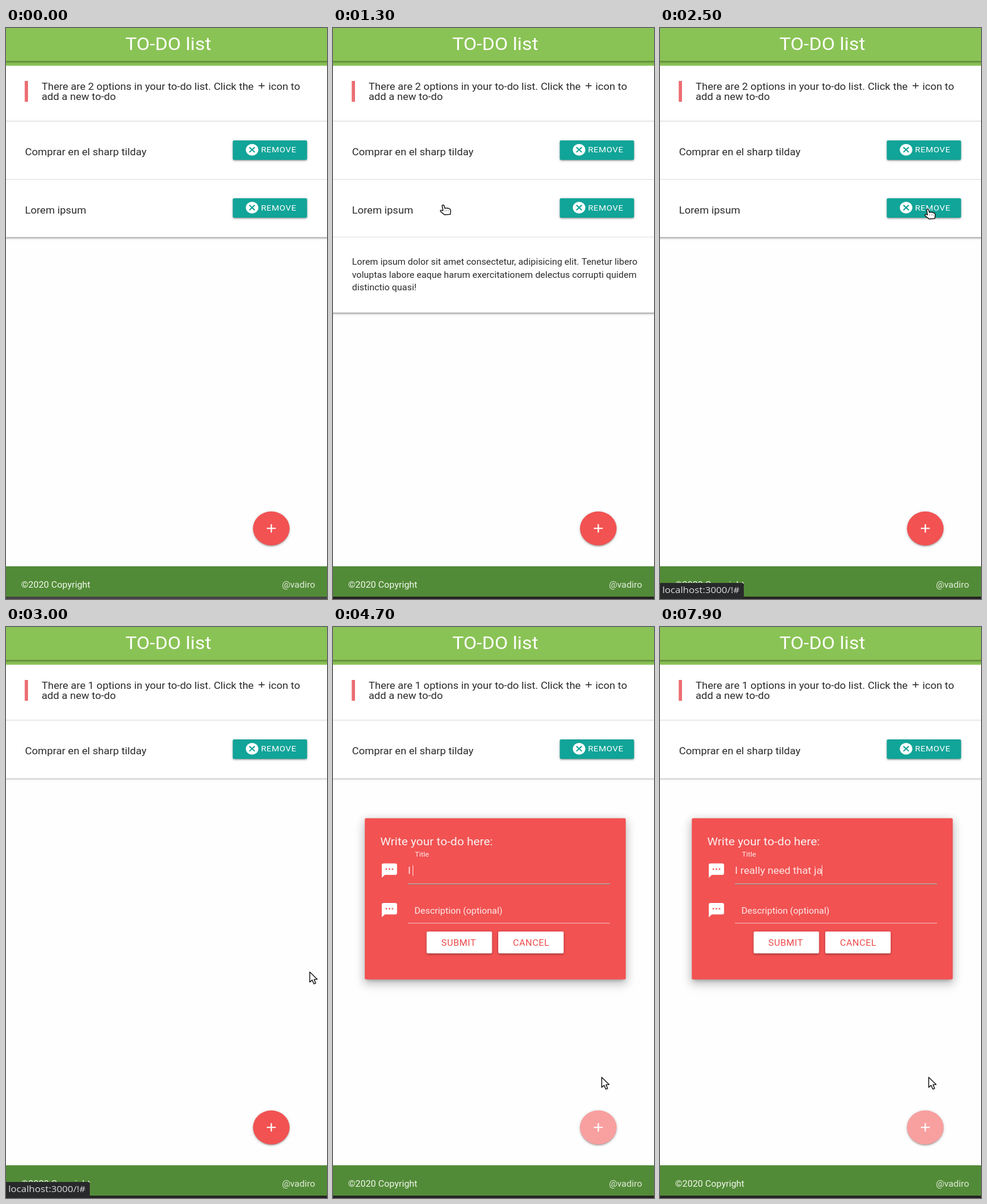
Write an HTML page with a canvas that moves like this. It is 540 px wide and 960 px high and loops after 8000 ms.

```html
<!DOCTYPE html>
<html lang="en">
<head>
<meta charset="utf-8">
<title>TO-DO list</title>
<style>
html, body { margin: 0; width: 100%; height: 100%; overflow: hidden; background: #fff; }
canvas { display: block; }
</style>
</head>
<body>
<canvas id="stage" width="540" height="960"></canvas>
<script>
const c = document.getElementById('stage').getContext('2d');
const SX = 1.1, SY = 1.02; // the page is shown slightly widened
const LOOP = 8000, STEP = 100;
const INK = '#2a2a2a', RED = '#f25252', TEAL = '#11a498', GREEN = '#8ac355';
const LOW = [[2, 2, 0, .14], [3, 1, -2, .12], [1, 5, 0, .2]];
const HIGH = [[8, 17, 2, .14], [3, 14, 2, .12], [5, 5, -3, .2]];

const ADD = new Path2D('M19 13h-6v6h-2v-6H5v-2h6V5h2v6h6v2z');
const CANCEL = new Path2D('M12 2C6.47 2 2 6.47 2 12s4.47 10 10 10 10-4.47 10-10S17.53 2 12 2zm5 13.59L15.59 17 12 13.41 8.41 17 7 15.59 10.59 12 7 8.41 8.41 7 12 10.59 15.59 7 17 8.41 13.41 12 17 15.59z');
const SMS = new Path2D('M20 2H4c-1.1 0-2 .9-2 2v18l4-4h14c1.1 0 2-.9 2-2V4c0-1.1-.9-2-2-2zM9 11H7V9h2v2zm4 0h-2V9h2v2zm4 0h-2V9h2v2z');
const ARROW = new Path2D('M0 0V17L4 13.6 7 20 10 18.7 7.3 12.6 12.5 12.3Z');
const HAND = new Path2D('M-1.5 1.5C0-.3 1.5.3 2 2L3 6C6 5 11 6.3 12.5 8 13.5 10.5 12.8 13 12.3 16.2L2.5 17C0 14.5-3.5 13-4.5 10.5-4 8.8-2 9.3 0 10.2Z');

// time, x, y of the pointer's hot spot
const POINTER = [
  [400, 541, 420], [800, 185, 297], [1400, 185, 297], [1750, 488, 322], [2050, 488, 322],
  [2300, 450, 304], [2700, 450, 304], [3000, 511, 580], [3400, 450, 825], [3700, 450, 825],
  [4100, 452, 757], [LOOP, 452, 757]
];
const PHRASE = 'I really need that ja';
const DETAILS = [
  'Lorem ipsum dolor sit amet consectetur, adipisicing elit. Tenetur libero',
  'voluptas labore eaque harum exercitationem delectus corrupti quidem',
  'distinctio quasi!'
];

const clamp = v => Math.max(0, Math.min(1, v));
const inOut = v => (v = clamp(v)) < .5 ? 4 * v ** 3 : 1 - 4 * (1 - v) ** 3;

function rect(x, y, w, h, color) {
  c.fillStyle = color;
  c.fillRect(x, y, w, h);
}

function text(str, x, y, size, color = INK, { align = 'left', spacing = 0, font = 'Roboto' } = {}) {
  c.save();
  c.transform(SX, 0, 0, SY, x, y);
  c.font = `${size}px "${font}", sans-serif`;
  c.textAlign = align;
  c.letterSpacing = spacing + 'px';
  c.fillStyle = color;
  c.fillText(str, 0, 0);
  const width = c.measureText(str).width * SX;
  c.restore();
  return width;
}

function icon(path, x, y, size, color) {
  c.save();
  c.translate(x, y);
  c.scale(size / 24 * SX, size / 24 * SY);
  c.translate(-12, -12);
  c.fillStyle = color;
  c.fill(path);
  c.restore();
}

function box(x, y, w, h, r, color, shadows) {
  const fill = (dx, grow) => {
    c.beginPath();
    c.roundRect(x + dx - grow, y - grow, w + 2 * grow, h + 2 * grow, r);
    c.fill();
  };
  c.save();
  c.fillStyle = color;
  for (const [dy, blur, spread, alpha] of shadows) {
    c.shadowOffsetX = 2000;
    c.shadowOffsetY = dy;
    c.shadowBlur = blur;
    c.shadowColor = `rgba(0,0,0,${alpha})`;
    fill(-2000, spread);
  }
  c.shadowColor = 'transparent';
  fill(0, 0);
  c.restore();
}

function header(count) {
  rect(0, 0, 540, 63.5, GREEN);
  box(-10, -10, 560, 65.5, 0, GREEN, LOW);
  text('TO-DO list', 273, 37, 29.4, '#fff', { align: 'center' });
  rect(31.5, 89, 5.5, 35, '#ec6d72');
  text(`There are ${count} options in your to-do list. Click the`, 60, 103.8, 16);
  icon(ADD, 430, 97, 16, INK);
  text('icon to', 441.5, 103.8, 16);
  text('add a new to-do', 60, 121, 16);
}

function row(label, y) {
  text(label, 32, y + 57.3, 16);
  box(381.5, y + 32, 125, 32.8, 2, TEAL, LOW);
  icon(CANCEL, 414, y + 47.7, 23, '#fff');
  text('REMOVE', 429, y + 52.4, 13, '#fff', { spacing: .5 });
}

function list(count, open) {
  const top = 157, pitch = 97.3, end = top + pitch * count;
  const height = 127 * open;
  box(-10, top, 560, end - top + height, 0, '#fff', LOW);
  rect(0, top - .5, 540, 1, '#ddd');
  row('Comprar en el sharp tilday', top);
  rect(0, top + pitch - .3, 540, 1, '#ddd');
  if (count < 2) return;
  row('Lorem ipsum', top + pitch);
  rect(0, end - .6, 540, 1, '#ddd');
  if (!open) return;
  c.save();
  c.beginPath();
  c.rect(0, end, 540, height);
  c.clip();
  DETAILS.forEach((line, i) => text(line, 32, end + 31 * open + 15.6 + 21.4 * i, 14));
  c.restore();
}

function field(label, y, focus, value) {
  icon(SMS, 94.9, y - 22, 28, '#fff');
  rect(126, y - .5, 340, 1, '#fac4c4');
  if (focus) rect(126, y + .2, 340, 1.1, '#7f7f78');
  text(label, 137 + focus * .7, y - 15.7 - 29.7 * focus, 14 - 2.8 * focus, '#fdeaea');
  if (focus < 1) return;
  const width = text(value, 126, y - 16.7, 16, '#fde4e4');
  rect(Math.round(126 + width) - 1, y - 31, 1, 18, '#fde4e4');
}

function dialog(t) {
  box(53.5, 321.5, 439, 271, 2, RED, HIGH);
  text('Write your to-do here:', 79.5, 366.5, 18.2, '#fdf0f0');
  const typed = t < 4500 ? 0 : Math.floor((t - 4500) / 168) + 1;
  field('Title', 431.5, clamp((t - 4000) / 200), PHRASE.slice(0, typed));
  field('Description (optional)', 498, 0, '');
  for (const [label, x] of [['SUBMIT', 157.5], ['CANCEL', 278]]) {
    box(x, 512, 110, 36.7, 2, '#fff', LOW);
    text(label, x + 24.7, 535.5, 14, '#ee4a4a', { spacing: .5 });
  }
}

function addButton(t) {
  const x = 415.5, y = 812.8, w = 61.6, h = 57.1;
  box(x, y, w, h, [{ x: w / 2, y: h / 2 }], RED, LOW);
  if (t > 3400) {
    c.save();
    c.beginPath();
    c.ellipse(x + w / 2, y + h / 2, w / 2, h / 2, 0, 0, 7);
    c.clip();
    c.beginPath();
    c.arc(451, 828, .16 * (t - 3400), 0, 7);
    c.fillStyle = 'rgba(255,255,255,.45)';
    c.fill();
    c.restore();
  }
  icon(ADD, 446.3, 841.3, 23.5, '#fff');
}

function footer(t) {
  rect(0, 905, 540, 55, '#528b37');
  text('©2020 Copyright', 25.5, 940.5, 14, '#f3f8f0');
  text('@vadiro', 520, 940.5, 14, '#e3ecdd', { align: 'right' });
  rect(0, 956, 540, 4, t < 100 ? '#444' : '#242424');
  if (t >= 2200 && t < 4200) {
    box(-5, 933, 146, 32, 3, '#28292b', []);
    text('localhost:3000/!#', 4, 950, 14.7, '#dcdcdc', { font: 'Open Sans' });
  }
}

function pointer(t, count) {
  const i = POINTER.findIndex(k => k[0] > t);
  if (i < 1) return;
  const [t0, x0, y0] = POINTER[i - 1], [t1, x1, y1] = POINTER[i];
  const p = inOut((t - t0) / (t1 - t0));
  const x = x0 + (x1 - x0) * p, y = y0 + (y1 - y0) * p;
  const overRow = y > 157 && y < 157 + 97.3 * count;
  const overAdd = Math.hypot(x - 446, y - 841) < 29;
  const hand = overRow || overAdd;
  c.save();
  c.translate(x, y);
  c.lineWidth = 1.5;
  c.lineJoin = 'round';
  c.strokeStyle = '#1c1c1c';
  c.fillStyle = '#fff';
  c.fill(hand ? HAND : ARROW);
  c.stroke(hand ? HAND : ARROW);
  if (hand) for (const dx of [3, 6, 9]) rect(dx, 9.5, 1, 1.5, '#666');
  c.restore();
}

function draw(t) {
  const count = t < 2800 ? 2 : 1;
  const open = t < 1800 ? inOut((t - 900) / 300) : 1 - inOut((t - 1817) / 300);
  rect(0, 0, 540, 960, '#fefefe');
  rect(0, 63, 540, 94, '#fff');
  header(count);
  list(count, open);
  if (t >= 3450) dialog(t);
  addButton(t);
  footer(t);
  pointer(t, count);
}

function tick() {
  draw(Math.floor(performance.now() % LOOP / STEP) * STEP);
  requestAnimationFrame(tick);
}
tick();
</script>
</body>
</html>
```
